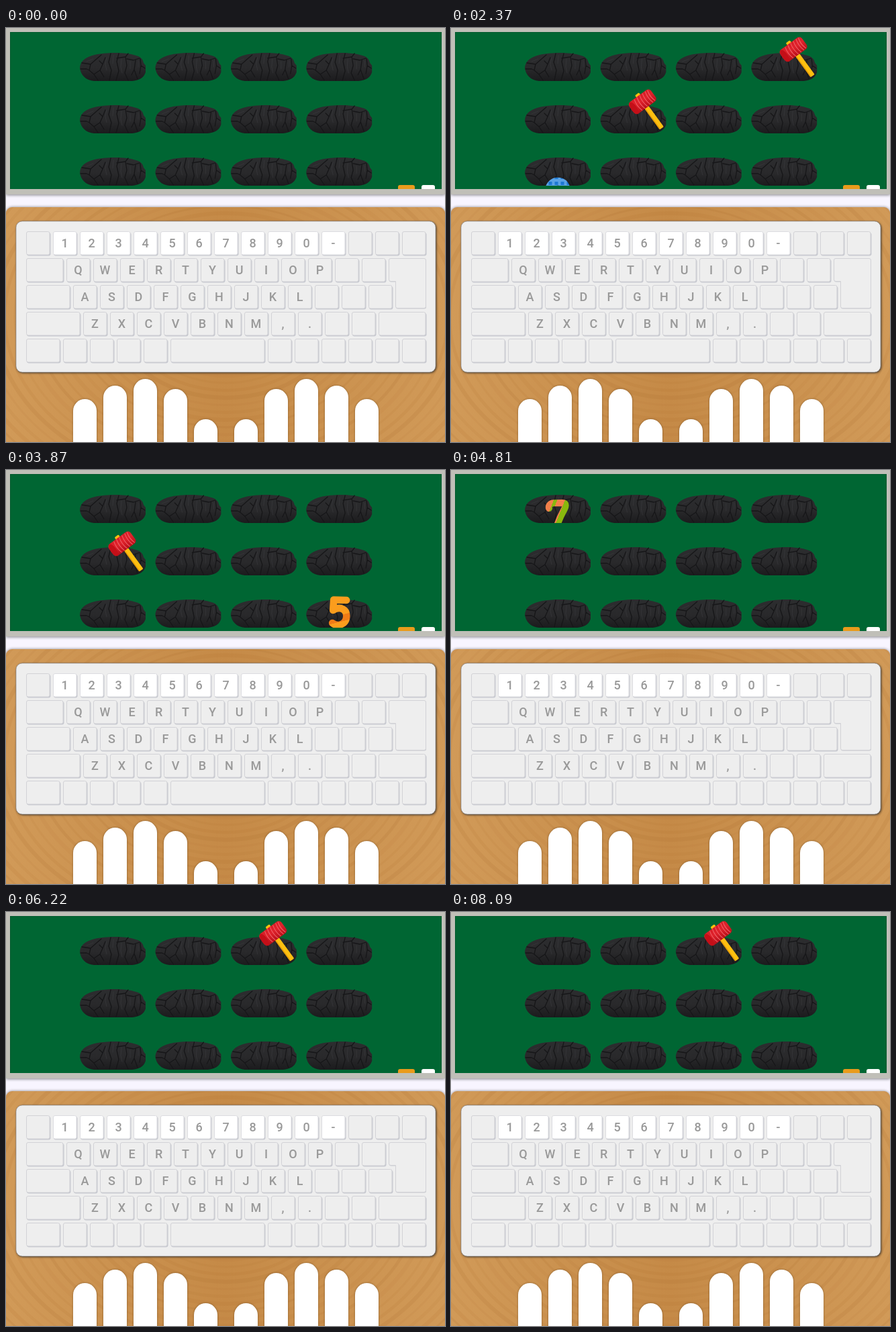
Write an HTML page that moves like this. It is 654 px wide and 617 px high and loops after 8230 ms.

```html
<!DOCTYPE html>
<html lang="en">
<head>
<meta charset="utf-8">
<title>Number whack typing game</title>
<style>
  html, body { margin: 0; width: 100%; height: 100%; overflow: hidden; background: #f8f5ff; }
  svg { display: block; position: absolute; left: 0; top: 0; }
  #keys text { font: 500 18px Roboto, "Liberation Sans", sans-serif; fill: #999; text-anchor: middle; }
  .key { fill: #eee; stroke: #d2d2d6; }
  .live { fill: #fff; stroke: #dcdce0; }
  .edge { fill: #c6c8cf; }
  .board { filter: drop-shadow(0 1px 2px #0007); }
  .desk { filter: drop-shadow(0 0 2px #0007); }
  .keyboard { filter: drop-shadow(1px 1px 1.5px #222c); }
  #hands { fill: #fff; filter: drop-shadow(0 0 1.5px #5a3a1899); }
  .stroke { fill: none; stroke-linecap: round; stroke-linejoin: round; }
</style>
</head>
<body>
<svg id="stage" width="654" height="617" viewBox="0 0 654 617">
  <defs>
    <linearGradient id="rubber" x2="0" y2="1">
      <stop offset="0" stop-color="#2c2d2f"/><stop offset=".55" stop-color="#29292b"/><stop offset="1" stop-color="#1b1b1d"/>
    </linearGradient>
    <linearGradient id="wood" x2="1" y2="0">
      <stop offset="0" stop-color="#d19a58"/><stop offset=".5" stop-color="#c58a47"/><stop offset="1" stop-color="#d19a58"/>
    </linearGradient>
    <linearGradient id="orange" gradientUnits="userSpaceOnUse" x1="8" y1="0" x2="20" y2="48">
      <stop offset=".6" stop-color="#fb9d1d"/><stop offset=".6" stop-color="#f07c17"/>
      <stop offset=".8" stop-color="#f07c17"/><stop offset=".8" stop-color="#fb9d1d"/>
    </linearGradient>
    <linearGradient id="candy" gradientUnits="userSpaceOnUse" x1="0" y1="0" x2="37" y2="15">
      <stop offset=".29" stop-color="#f2804a"/><stop offset=".29" stop-color="#8ab80e"/>
      <stop offset=".41" stop-color="#8ab80e"/><stop offset=".41" stop-color="#f2804a"/>
      <stop offset=".68" stop-color="#f2804a"/><stop offset=".68" stop-color="#8ab80e"/>
    </linearGradient>
    <pattern id="plaid" width="9" height="9" patternUnits="userSpaceOnUse">
      <path fill="#1d78d2" d="M0 0h9v9H0z"/>
      <path fill="#8cc4f4" fill-opacity=".55" d="M2 0h4v9H2zM0 3h9v4H0z"/>
    </pattern>
    <linearGradient id="red" x2="0" y2="1">
      <stop offset="0" stop-color="#d81c26"/><stop offset=".4" stop-color="#e0232c"/><stop offset="1" stop-color="#b80f19"/>
    </linearGradient>
    <clipPath id="cell"><path d="M-2 -60H101V43H-2z"/></clipPath>
    <clipPath id="deskClip"><rect y="267" width="654" height="360" rx="9"/></clipPath>

    <g id="hole">
      <path fill="url(#rubber)" d="M0 23C1 12 10 7 22 4C38 0 68 0 80 4C91 6 94 11 95 16L98 20L98 30C95 39 88 42 78 43H21C9 42 1 34 0 23Z"/>
      <path class="stroke" stroke="#161618" stroke-width="1.3" d="M3 16L16 18L25 10L32 4M16 18L14 27L21 33L27 42M21 33L30 27L34 18L29 13M34 18L38 8M30 27L36 37M46 2L43 15L47 27L44 42M58 2L55 14L58 28L54 42M55 9L68 7L72 2M68 7L70 20L67 31L72 42M70 10L80 12L89 9M83 12L81 26L86 40M90 10L91 20L97 24M81 26L77 34M1 25L10 25L14 27M91 20L89 32"/>
      <path class="stroke" stroke="#414245" stroke-opacity=".45" d="M40 8L38 18L40 27M50 5L49 17M62 10L61 22L63 31M75 14L75 25M20 10L10 14M87 13L87 22"/>
    </g>
    <g id="five" class="stroke">
      <path stroke="url(#orange)" stroke-width="10.5" d="M27 6L8 5.5L7 21C18 14 28 20 27 31C26 43 13 46 6 40"/>
    </g>
    <g id="seven" class="stroke">
      <path stroke="url(#candy)" stroke-width="10" d="M5 13C4 8 8 5 13 5.2L25 5C32 5 30 11 26 18C21 27 18 35 15 45"/>
    </g>
    <g id="nine" class="stroke">
      <path stroke="url(#plaid)" stroke-width="12" d="M32 19A12.5 12 0 1 1 31 14C34 28 31 43 12 44"/>
    </g>
    <g id="hammer">
      <rect x="-3.7" y="-28" width="7.4" height="63" rx="1.5" fill="#fdbf10"/>
      <path d="M-3 -2V34" stroke="#e39a08" stroke-width="1.4"/>
      <rect x="-20" y="-24.5" width="40" height="21.5" rx="5" fill="url(#red)"/>
      <path class="stroke" stroke="#f0636a" d="M-8 -23.5q-3 10 0 19.5M-3 -23.5q-3 10 0 19.5M2 -23.5q-3 10 0 19.5M7 -23.5q-3 10 0 19.5M12 -23.5q-3 10 0 19.5M16 -23q-3 9 0 18.5"/>
      <ellipse cx="-16" cy="-13.7" rx="4.4" ry="10.2" fill="#c40f18"/>
    </g>
  </defs>

  <g class="board">
    <path fill="#c0bfb8" d="M0 0H654V248H0z"/>
  </g>
  <path fill="#006633" d="M6 6H649V240H6z"/>
  <path fill="none" stroke="#004d27" stroke-opacity=".55" d="M6.5 240V6.5H648.5V240"/>
  <path fill="#e99b1c" d="M584 240V237q0 -3 3 -3H606q3 0 3 3V240z"/>
  <path fill="#fff" d="M619 240V237q0 -3 3 -3H636q3 0 3 3V240z"/>
  <g id="holes"></g>
  <g id="actors"></g>

  <rect class="desk" y="267" width="654" height="360" rx="9" fill="url(#wood)"/>
  <g id="rings" clip-path="url(#deskClip)" fill="none" stroke="#a86b2c"></g>
  <rect class="keyboard" x="15" y="288" width="625" height="225" rx="9" fill="#eee" stroke="#85858a" stroke-width=".6"/>
  <g id="keys"></g>
  <g id="hands"></g>
</svg>
<script>
const LOOP = 8230, STRIKE = 410;
const SWING = [-36, -50, -64, -36];
const KINDS = {
  five:  { x: 33, first: 13, step: 17, full: 64 },
  seven: { x: 31, first: 18, step: 17, full: 64 },
  nine:  { x: 29.5, first: 13, step: 18, full: 67 }
};
// kind, row, column, rise, end, struck
const DIGITS = [
  ["seven", 2, 3, 530, 1000, 1],
  ["seven", 0, 1, 1000, 1270, 1],
  ["seven", 0, 3, 1630, 2030, 1],
  ["seven", 1, 1, 1760, 2030, 1],
  ["nine",  2, 0, 2370, 2920, 0],
  ["seven", 1, 0, 3330, 3870, 1],
  ["five",  2, 3, 3730, 4330, 0],
  ["seven", 0, 0, 4740, 5000, 1],
  ["five",  2, 3, 5070, 5610, 0],
  ["seven", 1, 2, 5550, 6020, 0],
  ["five",  0, 2, 5750, 6000, 1],
  ["five",  1, 3, 6410, 6940, 0],
  ["seven", 0, 0, 7010, 7550, 0],
  ["nine",  1, 3, 7280, 7820, 0],
  ["five",  0, 2, 7560, 7890, 1]
];
// row, column, start
const HITS = DIGITS.filter(d => d[5]).map(d => [d[1], d[2], d[4]]);
HITS.push([1, 2, 2920]);

const byId = id => document.getElementById(id);
function add(parent, tag, attrs, text) {
  const el = document.createElementNS("http://www.w3.org/2000/svg", tag);
  for (const name in attrs) el.setAttribute(name, attrs[name]);
  if (text) el.textContent = text;
  parent.appendChild(el);
  return el;
}
const cellAt = (row, col) => `translate(${110 + 112.4 * col} ${36 + 78 * row})`;

for (let row = 0; row < 3; row++)
  for (let col = 0; col < 4; col++)
    add(byId("holes"), "use", { href: "#hole", transform: cellAt(row, col) });

for (let i = 1; i < 34; i++)
  add(byId("rings"), "ellipse", {
    cx: 328, cy: 430, rx: i * 15, ry: i * 11,
    "stroke-width": 3 + i % 3 * 1.5, "stroke-opacity": .07 + i % 4 * .025
  });

function addKey(x, y, width, label, live) {
  const g = byId("keys");
  add(g, "rect", { class: "edge", x: x + 1, y: y + 2, width: width - .5, height: 34.5, rx: 3 });
  add(g, "rect", { class: live ? "live" : "key", x: x + .5, y: y + .5, width: width - 1.5, height: 34.5, rx: 2.5 });
  if (label) add(g, "text", { x: x + width / 2 - .5, y: y + 24 }, label);
}
function addRow(x, y, labels, live) {
  for (const ch of labels) {
    addKey(x, y, 36, ch.trim(), live);
    x += 40;
  }
}
addRow(30, 303, " ");
addRow(70, 303, "1234567890-", true);
addRow(510, 303, "   ");
addKey(30, 343, 56);
addRow(90, 343, "QWERTYUIOP  ");
addKey(30, 383, 66);
addRow(100, 383, "ASDFGHJKL   ");
addKey(30, 423, 81);
addRow(115, 423, "ZXCVBNM,.  ");
addKey(555, 423, 71);
addKey(30, 463, 51);
addRow(85, 463, "    ");
addKey(245, 463, 141);
addRow(390, 463, "      ");
const enter = "M573 343.5H623q2.5 0 2.5 2.5V415q0 2.5 -2.5 2.5H583q-2.5 0 -2.5 -2.5V377.5H573q-2.5 0 -2.5 -2.5V346q0 -2.5 2.5 -2.5z";
add(byId("keys"), "path", { class: "edge", d: enter, transform: "translate(.5 1)" });
add(byId("keys"), "path", { class: "key", d: enter });

[553, 533, 523, 538, 583, 583, 538, 523, 533, 553].forEach((y, i) =>
  add(byId("hands"), "rect", { x: 100 + 45 * i + (i > 4 ? 15 : 0), y, width: 35, height: 130, rx: 17.5 }));

function addActor(shape, row, col) {
  const cell = add(byId("actors"), "g", { transform: cellAt(row, col), "clip-path": "url(#cell)" });
  return add(cell, "use", { href: "#" + shape });
}
const digits = DIGITS.map(([kind, row, col, rise, end, struck]) =>
  ({ ...KINDS[kind], rise, end, struck, el: addActor(kind, row, col) }));
const hammers = HITS.map(([row, col, start]) => ({ start, el: addActor("hammer", row, col) }));

// Motion advances in ticks of about 1/15 s.
const ticks = ms => Math.floor((ms + 8) / 68);

function height(d, t) {
  if (t < d.rise) return 0;
  if (t < d.end) return Math.min(d.full, d.first + d.step * ticks(t - d.rise));
  const n = ticks(t - d.end);
  return d.struck || n > 2 ? 0 : d.full - d.step * (n + 1);
}
function place(el, shown, transform) {
  el.style.display = shown ? "" : "none";
  if (shown) el.setAttribute("transform", transform);
}
function draw(now) {
  const t = now % LOOP;
  for (const d of digits) {
    const h = height(d, t);
    place(d.el, h > 0, `translate(${d.x} ${43 - h})`);
  }
  for (const { start, el } of hammers) {
    const age = t - start;
    const angle = SWING[Math.min(3, ticks(age))];
    place(el, age >= 0 && age < STRIKE, `translate(71 7) rotate(${angle})`);
  }
}
const begin = performance.now();
function frame() {
  draw(performance.now() - begin);
  requestAnimationFrame(frame);
}
frame();
</script>
</body>
</html>
```
